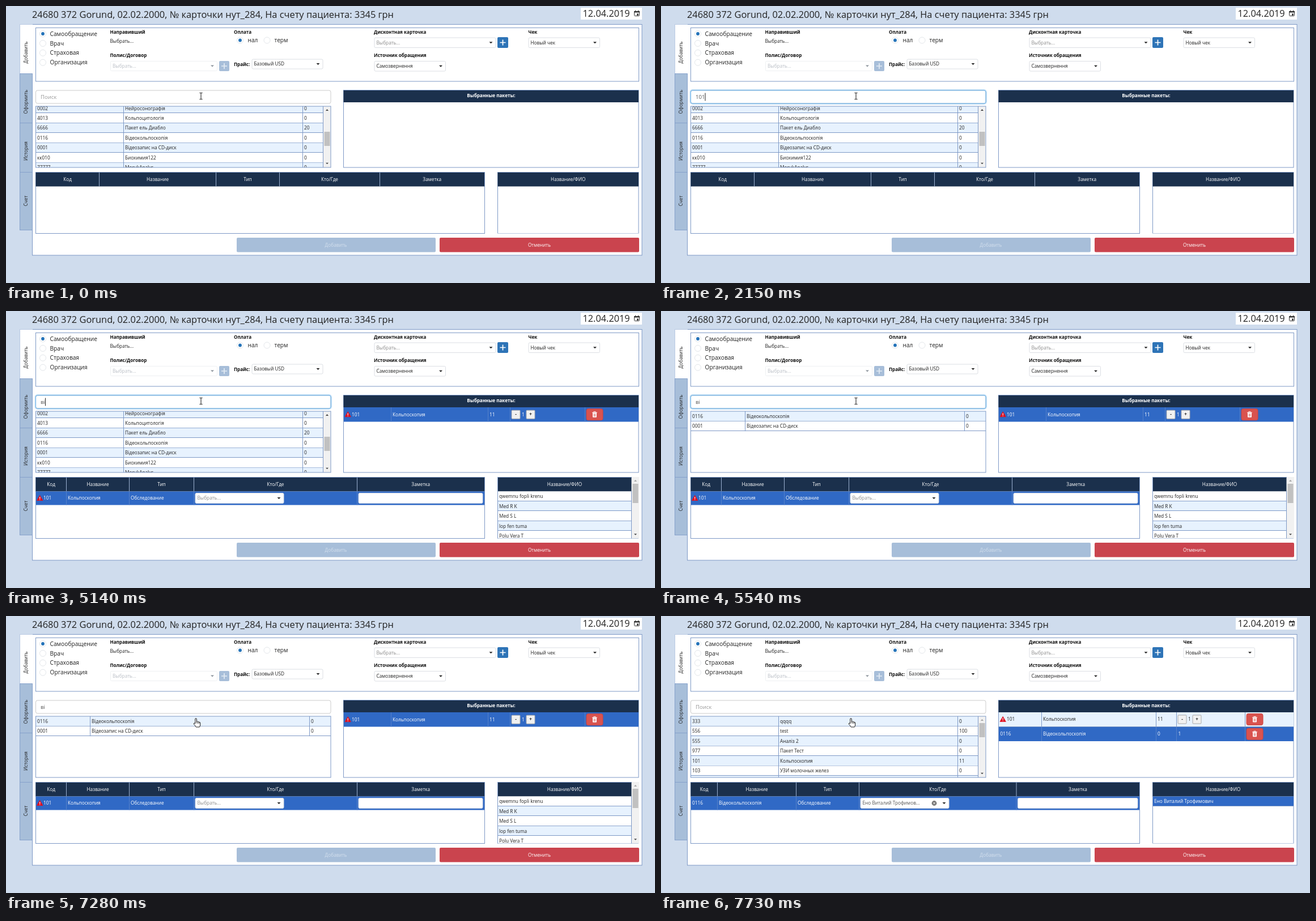
An HTML page that plays this animation: 1145 by 489 pixels, repeating every 8 s.

```html
<!DOCTYPE html>
<html lang="ru">
<head>
<meta charset="utf-8">
<title>Карточка пациента</title>
<style>
html, body { margin: 0; width: 100%; height: 100%; overflow: hidden; background: #cfdced; }
svg { display: block; width: 1145px; height: 489px; font-family: "Open Sans", "Noto Sans", sans-serif; }
text { white-space: pre; }
</style>
</head>
<body>
<svg id="stage" viewBox="0 0 1145 489">
  <defs>
    <clipPath id="listClip"><rect x="52" y="177" width="521" height="108"/></clipPath>
    <clipPath id="staffClip"><rect x="867" y="293" width="250" height="108.5"/></clipPath>
  </defs>
  <g id="base"></g>
  <g id="live"></g>
</svg>
<script>
const LOOP = 8000, SIZE = 8.25, ROW = 17.45;
const NAVY = '#1b304c', BLUE = '#3069c5', PALE = '#e7f2fe', LINE = '#7e99c6', INK = '#222';
const $ = id => document.getElementById(id);

// ---------- primitives ----------
const rect = (x, y, w, h, fill, stroke = 'none', r = 0) =>
  `<rect x="${x}" y="${y}" width="${w}" height="${h}" rx="${r}" fill="${fill}" stroke="${stroke}"/>`;
const path = (d, stroke, fill = 'none', w = 1) =>
  `<path d="${d}" fill="${fill}" stroke="${stroke}" stroke-width="${w}"/>`;
const vline = (x, y1, y2, c = LINE) => path(`M${x} ${y1}V${y2}`, c);
const hline = (x1, x2, y, c = LINE) => path(`M${x1} ${y}H${x2}`, c);
// y is the middle of the capitals
const text = (s, x, y, { fill = INK, size = SIZE, weight = 400, anchor = 'start' } = {}) =>
  `<text x="${x}" y="${y + size * 0.357}" fill="${fill}" font-size="${size}" font-weight="${weight}" text-anchor="${anchor}">${s}</text>`;
const bold = (s, x, y) => text(s, x, y, { size: 8.1, weight: 700, fill: '#111' });
const mid = (s, x, y, fill = '#fff', weight = 400) => text(s, x, y, { fill, weight, anchor: 'middle' });
const caretDown = (x, y, c = INK, r = 3) =>
  path(`M${x - r} ${y - r / 2}h${2 * r}l${-r} ${r}z`, 'none', c);
const caretUp = (x, y, c) => path(`M${x - 2.5} ${y + 1.5}h5l-2.5 -3z`, 'none', c);

// ---------- controls ----------
function radio(x, y, label, lx, on) {
  return `<circle cx="${x}" cy="${y}" r="5.5" fill="#fff" stroke="#e3e6ea"/>` +
    (on ? `<circle cx="${x}" cy="${y}" r="2.9" fill="#2473b9"/>` : '') +
    text(label, lx, y, { size: 10.2 });
}
function select(x, y, w, h, label, { fill = INK, arrow = INK, edge = '#dcdfe4' } = {}) {
  return rect(x + .5, y + .5, w - 1, h - 1, '#fff', edge, 2) +
    text(label, x + 4, y + h / 2, { fill }) + caretDown(x + w - 9, y + h / 2, arrow);
}
function plusButton(x, y, s, fill, ink) {
  const c = s / 2;
  return rect(x, y, s, s, fill, 'none', 2) +
    path(`M${x + c - 5} ${y + c}h10M${x + c} ${y + c - 5}v10`, ink, 'none', 1.7);
}
function stepButton(x, y, sign) {
  return rect(x + .5, y + .5, 15, 15, '#f1f1f1', '#a9a9a9', 1) +
    text(sign, x + 8, y + 7.5, { anchor: 'middle', weight: 700, size: 8 });
}
function trash(x, y) {
  return rect(x, y, 29, 20, '#d9534f', '#cf4440', 3) +
    `<g transform="translate(${x + 14.5} ${y + 10})">` +
    path('M-4.5 -3.5h9M-1.7 -3.7v-1.3h3.4v1.3', '#fff') +
    path('M-3.5 -3v7q0 1 1 1h5q1 0 1 -1v-7z', 'none', '#fff') +
    path('M-1.5 -1.5v5M0 -1.5v5M1.5 -1.5v5', '#d9534f', 'none', .7) + '</g>';
}
function warning(x, y) {
  return path(`M${x} ${y + 4.5}l5.2 -9 5.2 9z`, '#e01020', '#e01020', .8) +
    path(`M${x + 5.2} ${y - 1.7}v3.2M${x + 5.2} ${y + 2.4}v1.2`, '#fff', 'none', 1.2);
}
function scrollbar(x, top, bottom, thumbY, thumbH, atTop) {
  return rect(x, top, 13, bottom - top, '#f1f1f1') +
    rect(x + 1.5, thumbY, 10, thumbH, '#c1c1c1') +
    caretUp(x + 6.5, top + 6.5, atTop ? '#a3a3a3' : '#444') +
    caretDown(x + 6.5, bottom - 7, '#444', 2.5);
}
function headRow(x1, x2, y, h, cols, names) {
  const edges = [x1, ...cols, x2];
  return rect(x1, y, x2 - x1, h, NAVY) +
    cols.map(c => vline(c, y, y + h, '#9bb0d0')).join('') +
    names.map((n, i) => mid(n, (edges[i] + edges[i + 1]) / 2, y + h / 2 + .3)).join('');
}

// ---------- unchanging page ----------
function page() {
  let s = text('24680 372 Gorund, 02.02.2000, № карточки нут_284, На счету пациента: 3345 грн', 46, 15.2, { size: 16.4 });
  s += rect(1014, 3, 108, 21, '#fff') + text('12.04.2019', 1017.5, 13.5, { size: 16.3 });
  s += rect(1108.5, 9.5, 9, 8, '#fff', '#333', 1) + rect(1108, 9, 10, 2.5, '#333') + rect(1113, 13.5, 3, 3, '#333');
  s += path('M1110.5 7.5v2M1115.5 7.5v2', '#333');

  s += rect(46.5, 32.5, 1075.5, 407.5, '#fff', LINE);
  const tabs = [['Добавить', 32, 119, 82], ['Оформить', 119, 206, 169], ['История', 206, 293, 256], ['Счет', 293, 395, 344]];
  tabs.forEach(([name, a, b, c], i) => {
    s += rect(24.5, a + .5, 22, b - a, i ? '#a7bed9' : '#fff', i ? '#86a1cb' : '#b9cae3');
    s += `<g transform="translate(35 ${c}) rotate(-90)">${mid(name, 0, 0, INK)}</g>`;
  });
  s += vline(46.5, 33, 119, '#fff');

  s += rect(52.5, 38.5, 1064, 94.5, '#fff', LINE);
  ['Самообращение', 'Врач', 'Страховая', 'Организация'].forEach((n, i) => {
    s += radio(65, 49 + 16.9 * i, n, 77.5, !i);
  });
  const faint = { fill: '#b9bec5', arrow: '#8d949c', edge: '#eef0f2' };
  s += bold('Направивший', 183.5, 46) + text('Выбрать...', 183.5, 62);
  s += bold('Полис/Договор', 183.5, 87.5) + select(184, 97, 189, 18, 'Выбрать...', faint);
  s += plusButton(376, 97, 18, '#a7bed9', '#e3ebf4');
  s += bold('Оплата', 402, 46) + radio(413, 60.5, 'нал', 426.5, true) + radio(460.5, 60.5, 'терм', 473.5);
  s += bold('Прайс:', 402, 103) + select(433.5, 93.5, 126, 18, 'Базовый USD');
  s += bold('Дисконтная карточка', 649, 46) + select(649.5, 55.5, 215, 18.5, 'Выбрать...', { fill: '#8c8c8c' });
  s += plusButton(867, 55, 19, '#2e74b7', '#fff');
  s += bold('Источник обращения', 649, 87.5) + select(649.5, 97, 126.5, 18.5, 'Самозвернення');
  s += bold('Чек', 921.5, 46) + select(921.5, 55.5, 126.5, 18.5, 'Новый чек');

  s += rect(407, 409, 351, 25.5, '#a7bed9', 'none', 2) + mid('Добавить', 582, 422, '#d3dfed');
  s += rect(765, 409, 352, 25.5, '#ca444e', 'none', 2) + mid('Отменить', 941, 422);
  return s;
}

// ---------- catalogue ----------
const MIDDLE = [['0002', 'Нейросонографія', 0], ['4013', 'Кольпоцитологія', 0], ['6666', 'Пакет ель Диабло', 20],
  ['0116', 'Відеокольпоскопія', 0], ['0001', 'Відеозапис на CD-диск', 0], ['кк010', 'Биохимия122', 0], ['77777', 'MorukAnalys', 0]];
const FOUND = MIDDLE.slice(3, 5);
const FIRST = [['333', 'qqqq', 0], ['556', 'test', 100], ['555', 'Аналіз 2', 0], ['977', 'Пакет Тест', 0],
  ['101', 'Кольпоскопия', 11], ['103', 'УЗИ молочных желез', 0], ['104', 'УЗИ', 0]];

function catalogue(rows, top, c1, c2, right) {
  let s = rect(52.5, 177, 520.5, 108, '#fff');
  rows.forEach((r, i) => {
    const y = top + ROW * i, c = y + ROW / 2;
    s += rect(53, y, right - 53, ROW, i % 2 ? '#fff' : PALE) + hline(53, right, Math.round(y + ROW) - .5);
    s += text(r[0], 55, c) + text(r[1], c1 + 2.5, c) + text(r[2], c2 + 2.5, c);
  });
  const end = Math.min(285, top + ROW * rows.length);
  s += vline(c1, 177, end) + vline(c2, 177, end);
  if (right < 573) s += vline(right, 177, 285);
  return s;
}
function list(t) {
  let s;
  if (t < 5540) s = catalogue(MIDDLE, 171.9, 207.5, 523.5, 559.5) + scrollbar(560, 177, 285, 222, 25);
  else if (t < 7430) s = catalogue(FOUND, 177.3, 148.5, 535.5, 573);
  else s = catalogue(FIRST, 177.3, 207.5, 523.5, 559.5) + scrollbar(560, 177, 285, 189, 25, true);
  return `<g clip-path="url(#listClip)">${s}</g>` + rect(52.5, 177, 520.5, 108, 'none', LINE);
}

// ---------- chosen packages ----------
function packageRow(y, h, cols, code, name, price, on, warn, steps) {
  const [a, b, c, d] = cols, m = y + h / 2, fill = on ? '#fff' : INK;
  let s = rect(596, y, 520, h, on ? BLUE : PALE);
  s += cols.map(x => vline(x, y, y + h, on ? '#5480c9' : LINE)).join('');
  if (warn) s += warning(598, m - .5);
  s += text(code, warn ? 610 : 598.5, m, { fill }) + text(name, a + 2.5, m, { fill }) + text(price, b + 2.5, m, { fill });
  s += text('1', c + (steps ? 20.5 : 3), m, { fill });
  if (steps) s += stepButton(c + 2, m - 8, '-') + stepButton(c + 28, m - 8, '+');
  return s + trash(d + 2.5, m - 10);
}
function packages(t) {
  let s = rect(595.5, 148.5, 520.5, 136.5, '#fff', LINE) + rect(595.5, 149, 520.5, 21, NAVY);
  s += text('Выбранные пакеты:', 856, 158, { fill: '#fff', size: 8.1, weight: 700, anchor: 'middle' });
  if (t >= 7430) {
    const cols = [671.5, 873.5, 909.5, 1030.5];
    s += packageRow(170, 25, cols, '101', 'Кольпоскопия', '11', false, true, true);
    s += packageRow(195.5, 25.5, cols, '0116', 'Відеокольпоскопія', '0', true, t < 7580, false);
    s += hline(596, 1116, 195.5);
  } else if (t >= 2710) {
    s += packageRow(170, 25.5, [679.5, 850.5, 889.5, 1021.5], '101', 'Кольпоскопия', '11', true, true, true);
  }
  return s;
}

// ---------- details ----------
const HEADS = ['Код', 'Название', 'Тип', 'Кто/Где', 'Заметка'];
function details(t) {
  const last = t >= 7430, filled = t >= 2710;
  const cols = last ? [99.5, 238.5, 349.5, 627] : filled ? [106.5, 217.5, 331.5, 619.5] : [164.5, 370.5, 482.5, 659.5];
  let s = rect(52.5, 293.5, 792, 108, '#fff', LINE) + headRow(52.5, 844, 294, 24.5, cols, HEADS);
  if (!filled) return s;
  const warn = t < 7580, named = t >= 7730, fill = '#fff', y = 330.5, w = { fill };
  s += rect(53, 318.5, 791, 24, BLUE) + cols.map(x => vline(x, 318.5, 342.5, '#5480c9')).join('');
  if (warn) s += warning(54.5, y - .5);
  s += text(last ? '0116' : '101', warn ? 66 : 55, y, w);
  s += text(last ? 'Відеокольпоскопія' : 'Кольпоскопия', cols[0] + 2.5, y, w);
  s += text('Обследование', cols[1] + 2.5, y, w);
  s += select(cols[2] + 2, 321, 157, 19, named ? 'Ено Виталий Трофимов...' : 'Выбрать...', { fill: named ? '#555' : '#8c8c8c' });
  if (named) s += '<circle cx="482" cy="330.5" r="4.4" fill="#777"/>' + path('M480.3 328.8l3.4 3.4M483.7 328.8l-3.4 3.4', '#fff');
  return s + rect(cols[3] + 2.5, 321.5, 838.5 - cols[3], 18, '#fff', '#d5dbe5', 2);
}

// ---------- staff ----------
const STAFF = ['qwemnu fopli krenu', 'Med R K', 'Med S L', 'lop fen tuma', 'Polu Vera T'];
function staff(t) {
  const last = t >= 7430, many = t >= 2710 && !last, right = many ? 1103.5 : 1116;
  const names = last ? ['Ено Виталий Трофимович'] : many ? STAFF : [];
  let s = many ? rect(867, 293, 249.5, 108.5, '#fff') : rect(867.5, 293.5, 248.5, 108, '#fff', LINE);
  s += headRow(867.5, right, 294, 24.5, [], ['Название/ФИО']);
  names.forEach((n, i) => {
    const y = 318.5 + ROW * i, on = last && t >= 7580;
    s += rect(868, y, right - 868, ROW, on ? BLUE : i % 2 || last ? PALE : '#fff');
    s += hline(868, right, Math.round(y + ROW) - .5) + text(n, 870, y + ROW / 2, { fill: on ? '#fff' : INK });
  });
  if (many) s += scrollbar(1104, 293, 401.5, 305, 34, true) +
    vline(867.5, 293, 402) + vline(1103.5, 318, 402) + hline(867, 1116, 401.5) + hline(867, 1104, 293.5);
  return `<g clip-path="url(#staffClip)">${s}</g>`;
}

// ---------- search field ----------
const TYPED = [[0, ''], [1600, '1'], [1870, '10'], [2150, '101'], [2710, ''], [4830, 'в'], [5140, 'ві'], [7430, '']];
const FOCUS = [[0, 0], [270, .5], [390, 1], [7160, .5], [7280, 0]];
const BLINK = [[0, 0], [270, 1], [800, 0], [1330, 1], [2710, 1], [3120, 0], [3680, 1], [4270, 0], [4830, 1], [5540, 0], [6100, 1], [6680, 0]];
const CARET = { '': 61.5, '1': 67, '10': 72.5, '101': 78, 'в': 67, 'ві': 69.5 };
const at = (track, t) => track.filter(k => k[0] <= t).pop().slice(1);

function search(t) {
  const [typed] = at(TYPED, t), [focus] = at(FOCUS, t), [caret] = at(BLINK, t);
  let s = rect(52.5, 149, 520.5, 23, '#fff', '#cbcbcb', 3);
  s += `<g opacity="${focus}">` + `<rect x="51.5" y="148" width="522.5" height="25" rx="4" fill="none" stroke="#66afe9" stroke-opacity=".35" stroke-width="2"/>` +
    rect(52.5, 149, 520.5, 23, 'none', '#66afe9', 3) + '</g>';
  s += text(typed || 'Поиск', 61, 160.8, { size: 9.6, fill: typed ? '#555' : '#999' });
  return s + (caret ? vline(CARET[typed], 153.5, 167.5, '#222') : '');
}

// ---------- pointer ----------
const MOVES = [[0, 344, 159], [6220, 343.5, 159], [6380, 341.5, 160], [6530, 337, 169.5], [6680, 336, 178], [6800, 335, 181]];
function pointer(t) {
  const [x, y] = at(MOVES, t);
  const shape = t < 6680
    ? path('M-2.5 -5.7h1.8l.7 .6 .7 -.6h1.8M0 -5.2v10.4M-2.5 5.7h1.8l.7 -.6 .7 .6h1.8', '#111')
    : path('M-1.2 9V1Q-1.2 -.3 0 -.3T1.3 1V5.2Q2.6 4.3 3.6 5.8Q5 5 5.8 6.4Q7.7 6 7.7 8V11Q7.7 13 6.4 15H.2Q-1 12.5 -3.3 10.2Q-4.3 8.6 -3 8Q-2 7.7 -1.2 9z', '#111', '#fff', .95) +
      path('M1.3 5v3.5M3.6 6v3M5.8 6.6v2.5', '#111', 'none', .8);
  return `<g transform="translate(${x} ${y})">${shape}</g>`;
}

let shown = '';
function render(t) {
  const s = list(t) + packages(t) + details(t) + staff(t) + search(t) + pointer(t);
  if (s !== shown) $('live').innerHTML = shown = s;
}

$('base').innerHTML = page();
const start = performance.now();
function tick() {
  render((performance.now() - start) % LOOP);
  requestAnimationFrame(tick);
}
tick();
</script>
</body>
</html>
```
